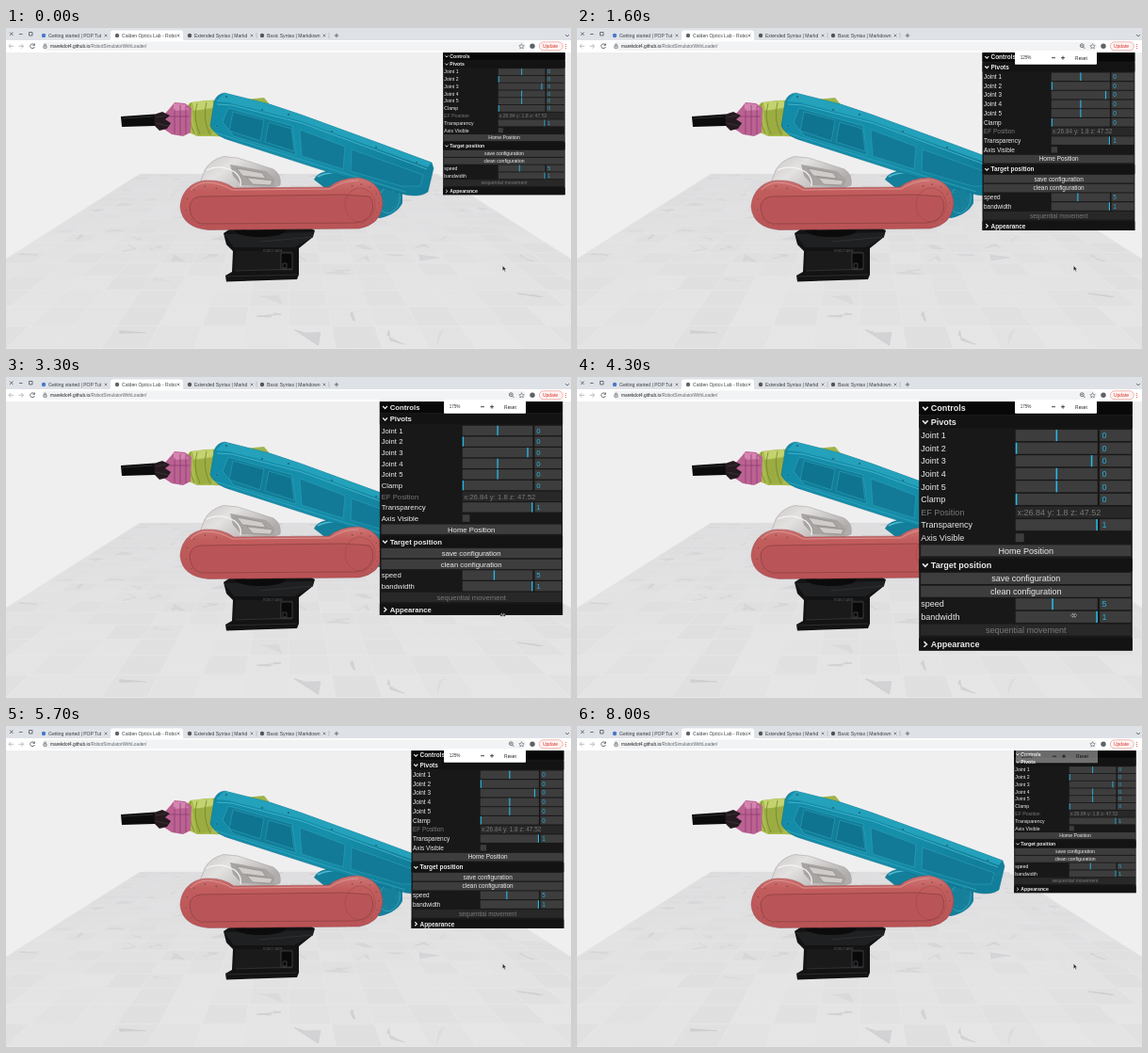
An HTML page for the animation above (8.1 s loop, 600 by 341 pixels).

```html
<!DOCTYPE html>
<html lang="en">
<head>
<meta charset="utf-8">
<title>Robot simulator zoom</title>
<style>
html, body { margin: 0; width: 100%; height: 100%; overflow: hidden; background: #f0eff0; }
svg { display: block; width: 100vw; height: 100vh; font-family: "Liberation Sans", Arial, sans-serif; }
text { white-space: pre; }
.line { fill: none; stroke: #5f6368; stroke-width: .9; }
</style>
</head>
<body>
<svg viewBox="0 0 600 341" preserveAspectRatio="none">
  <defs>
    <linearGradient id="red" x2="0" y2="1">
      <stop offset="0" stop-color="#cf7876"/><stop offset=".25" stop-color="#c25d5d"/><stop offset="1" stop-color="#b95356"/>
    </linearGradient>
    <linearGradient id="blue" x2="1" y2=".4">
      <stop offset="0" stop-color="#128ba8"/><stop offset=".6" stop-color="#168fab"/><stop offset="1" stop-color="#117f9b"/>
    </linearGradient>
    <linearGradient id="white" x2="1" y2=".5">
      <stop offset="0" stop-color="#c9c6c4"/><stop offset=".4" stop-color="#e4e2e1"/><stop offset="1" stop-color="#b0adac"/>
    </linearGradient>
    <linearGradient id="haze" x2="0" y2="1">
      <stop offset="0" stop-color="#dad9db" stop-opacity=".6"/><stop offset="1" stop-color="#e8e8e9" stop-opacity=".15"/>
    </linearGradient>
    <clipPath id="page"><path d="M0 26H600V341H0z"/></clipPath>
  </defs>

  <g clip-path="url(#page)">
    <rect y="26" width="600" height="315" fill="#f0eff0"/>
    <g id="floor"></g>
    <path d="M142 155H458L752 341H-152z" fill="url(#haze)"/>

    <!-- base -->
    <path d="M231 218L240 212H322L328 215L326 222L311 234V262L309 267L234 269.5L233 263L240 259L241 237L234 230z" fill="#131314"/>
    <path d="M232 219L326 217V222L306 233H242z" fill="#1f2021"/>
    <path d="M244 237H304V258H242z" fill="#1a1a1b"/>
    <path d="M234 264L309 262M244 258L304 256M270 227L326 222" stroke="#38383a" stroke-width=".7"/>
    <path d="M292 239H304V256H292zM294 250H298V255H294z" fill="#09090a" stroke="#5a5a5c" stroke-width=".6"/>
    <text x="273" y="238" font-size="3.4" fill="#55565a">ROBOT ARM</text>
    <ellipse cx="270" cy="215" rx="27" ry="7" fill="#0b0b0c"/>

    <!-- shoulder -->
    <path d="M206 165L211 151Q217 140 231 136.5L246 138L284 150Q293 156 291 167L280 171H208z" fill="url(#white)" stroke="#9c9997" stroke-width=".5"/>
    <path d="M238 145L276 152L286 161L284 168L250 167L241 157z" fill="#a7a4a2"/>
    <path d="M245 149L272 154L276 160L251 157zM256 159L283 162L281 167L262 166z" fill="#cfccca" stroke="#868381" stroke-width=".6"/>
    <path d="M213 151Q227 144 243 153Q251 160 249 168" fill="none" stroke="#f6f5f4" stroke-width="1.2"/>

    <!-- wrist -->
    <path d="M254 76L274 74L279 80L281 87L250 84z" fill="#9fb44c"/>
    <path d="M190 85L196 79L212 77L240 76V116L220 115L203 115L192 110z" fill="#a9bb4d"/>
    <path d="M198 79L219 77L222 84L200 88z" fill="#c4d36f"/>
    <path d="M198 88L219 86V113L203 114z" fill="#9bad42"/>
    <path d="M196 80Q192 97 200 112M203 80Q198 96 206 113M213 79Q208 96 217 114" fill="none" stroke="#71832d" stroke-width=".8"/>
    <path d="M175 84L179 79L190 80L197 85L196 111L188 115L176 113L167 107L168 92z" fill="#bb6292"/>
    <path d="M178 80L190 81L194 87L178 88z" fill="#d585b0"/>
    <path d="M179 86V113M185 82V114M191 83V113M172 94H195" stroke="#84386a" stroke-width=".7"/>
    <path d="M122 94L158 91.5V104L123 105z" fill="#0c0c0d"/>
    <path d="M157 92L166 89L174 93L169 97L175 101L171 107L163 109L158 104z" fill="#241a20"/>
    <path d="M124 96L156 94M159 95L170 93M159 101L172 104" stroke="#444" stroke-width=".6"/>

    <!-- elbow -->
    <path d="M327 161Q331 152 348 151L400 160L421 173V186Q415 198 397 202L385 200L345 175z" fill="#147f9b"/>
    <ellipse cx="407" cy="182" rx="11" ry="15" transform="rotate(15 407 182)" fill="#16809b" stroke="#3aa9c0" stroke-width=".7"/>
    <path d="M331 158Q348 149 366 160" fill="none" stroke="#4dbbd0" stroke-width="1.5"/>

    <!-- upper arm -->
    <path d="M217 104L221 78Q224 70 232 69L280 81L313 92L398 123L452 143L454 149L448 174Q440 180 424 177L349 155L240 120Q222 115 217 104z" fill="url(#blue)" stroke="#0d6b85" stroke-width=".5"/>
    <path d="M232 69L280 81L313 92L398 123L452 143L448 148L314 99L236 79L223 78z" fill="#24a1bb"/>
    <path d="M224 81L240 82L314 101L447 150" fill="none" stroke="#4fbacf" stroke-width=".8"/>
    <path d="M236 85L304 104L308 135L242 115L230 100z" fill="#117d98" stroke="#36a6be" stroke-width=".6"/>
    <path d="M241 89L274 98L270 120L237 109zM279 100L303 107L306 131L275 121z" fill="#0f7490" stroke="#2ea1bb" stroke-width=".6"/>
    <path d="M312 108L360 126L358 150L314 136zM367 129L443 156L440 168L420 168L366 152z" fill="#127a96" stroke="#2f9fb8" stroke-width=".6"/>
    <path d="M222 111L345 150L424 174" fill="none" stroke="#3aa9c0" stroke-width=".7"/>
    <g id="blueBolts" fill="#0b5f79" stroke="#45b0c6" stroke-width=".4"></g>

    <!-- forearm -->
    <path d="M185 190C186 173 198 163 212 162Q230 161 242 170L343 169Q355 159 374 159Q399 163 400 187Q398 209 375 213L215 214.5Q187 212 185 190z" fill="url(#red)" stroke="#94464a" stroke-width=".5"/>
    <path d="M196 172Q203 165 213 164Q229 165 240 172L344 171Q358 162 374 162" fill="none" stroke="#dc9390" stroke-width="1"/>
    <path d="M195 190Q196 180 207 179L358 177L386 179Q391 184 389 194Q385 206 371 207L207 208Q196 205 195 190z" fill="#b95558" stroke="#8d4043" stroke-width=".8"/>
    <ellipse cx="376" cy="188" rx="16" ry="18" fill="none" stroke="#a04649" stroke-width=".6"/>
    <g id="redBolts" fill="#8d4043" stroke="#d78b88" stroke-width=".3"></g>

    <g id="panel" font-size="5.16" fill="#ebebeb"></g>
    <path id="arrow" d="M527.3 252.5V258L528.7 256.8L529.7 259L530.5 258.6L529.6 256.5H531.3z" fill="#222" stroke="#fff" stroke-width=".4"/>
    <path id="resize" d="M524.5 253.2L526.6 251.2V252.6H528.6V251.2L530.7 253.2L528.6 255.2V253.8H526.6V255.2z" fill="#111" stroke="#fff" stroke-width=".5"/>
  </g>

  <!-- browser bar -->
  <g id="bar">
    <rect width="600" height="13.5" fill="#dee1e6"/>
    <rect y="13" width="600" height="13" fill="#fff"/>
    <path d="M109 13.5Q111 13.5 111 11V5Q111 2.5 113.5 2.5H185.5Q188 2.5 188 5V11Q188 13.5 190 13.5z" fill="#fff"/>
    <path d="M266 5V11M343 5V11" class="line" style="stroke:#9a9da2;stroke-width:.5"/>
    <path d="M4 4.5L7.5 8M7.5 4.5L4 8M14 6.5H17.5M24.5 4.5H28V8H24.5z" class="line"/>
    <path d="M348.8 8H353.2M351 5.8V10.2M594 7L596 9L598 7" class="line"/>
    <rect x="38" y="14.6" width="514" height="9.4" rx="4.7" fill="#f1f3f4"/>
    <g class="line">
      <path d="M8 19.3H3M5.2 17L3 19.3L5.2 21.6M13.5 19.3H18.5M16.3 17L18.5 19.3L16.3 21.6" stroke="#b4b7ba"/>
      <path d="M30 17.8A2.4 2.4 0 1 0 30.4 20M30.4 16.5V18.4H28.5"/>
      <path d="M40 19H43V21.3H40zM40.5 19V18A1 1 0 0 1 42.5 18V19" stroke-width=".7"/>
      <path d="M547.5 16.7L548.3 18.5L550.2 18.7L548.8 20L549.2 21.9L547.5 20.9L545.8 21.9L546.2 20L544.8 18.7L546.7 18.5z" stroke-width=".6"/>
      <g id="lens"><circle cx="536.3" cy="18.7" r="1.9"/><path d="M537.7 20.2L539.5 22M535.4 18.7H537.2"/></g>
    </g>
    <circle cx="559" cy="19.3" r="2.7" fill="#5f6368"/>
    <rect x="566.3" y="14.8" width="25" height="9" rx="4.5" fill="#fdf3f2" stroke="#e58b84" stroke-width=".6"/>
    <text x="578" y="21.2" font-size="5" text-anchor="middle" fill="#d93025">Update</text>
    <path d="M594.5 17V17.8M594.5 19V19.8M594.5 21V21.8" class="line" style="stroke:#d93025"/>
    <text y="21" x="47" font-size="4.8" fill="#202124">marekdot4.github.io<tspan fill="#5f6368">/RobotSimulatorWithLoader/</tspan></text>
  </g>

  <g id="bubble">
    <rect x="464.6" y="25.6" width="88" height="14" rx="1" fill="#000" opacity=".18"/>
    <rect x="465" y="25" width="87" height="13.8" rx=".8" fill="#fff"/>
    <text id="level" x="476.5" y="33.3" font-size="4.6" text-anchor="middle" fill="#333"></text>
    <path d="M504 31.7H508M514 31.7H518M516 29.7V33.7" class="line" style="stroke:#333"/>
    <text x="535.5" y="33.5" font-size="4.9" text-anchor="middle" fill="#222">Reset</text>
  </g>
</svg>
<script>
const $ = id => document.getElementById(id);
const add = (id, markup) => $(id).insertAdjacentHTML("beforeend", markup);

let seed = 11;
const rand = () => (seed = seed * 16807 % 2147483647) / 2147483647;

// Floor of marble tiles seen in perspective
function floorPoint(u, v) {
  const depth = 1 / (.01 - v * 3.25e-4);
  return [300 + u * .175 * depth, 55 + depth].map(n => n.toFixed(1)).join(" ");
}
let tiles = "";
for (let v = 0; v < 22; v++) for (let u = -9; u < 9; u++) {
  const g = 222 + Math.floor(rand() * 8);
  const at = (a, b) => floorPoint(u + a, v + b);
  tiles += `<path d="M${at(0, 0)}L${at(1, 0)} ${at(1, 1)} ${at(0, 1)}z" fill="rgb(${g},${g},${g + 1})" stroke="#e8e7e9" stroke-width=".7"/>`;
  if (rand() < .16) {
    const spot = () => at(.1 + rand() * .8, .1 + rand() * .8);
    tiles += `<path d="M${spot()}L${spot()} ${spot()} ${spot()}" fill="#bdbec1" stroke="#b4b5b8" stroke-linejoin="round" opacity="${(.2 + rand() * .4).toFixed(2)}"/>`;
  }
}
add("floor", tiles);

const bolt = (x, y, r) => `<circle cx="${x}" cy="${y}" r="${r}"/>`;
const ring = (cx, cy, rx, ry, from, to, n) => Array.from({ length: n }, (_, i) => {
  const a = from + (to - from) * i / (n - 1);
  return bolt(cx + rx * Math.cos(a), cy + ry * Math.sin(a), 1.1);
}).join("");
add("redBolts", ring(213, 189, 22, 21, 1.8, 5.2, 7) + ring(376, 187, 20, 21, -2, 1.4, 8));
add("blueBolts", [[234, 73], [272, 87], [300, 92], [346, 110], [393, 127], [436, 143], [224, 104], [447, 157]]
  .map(([x, y]) => bolt(x, y, 1.3)).join("") + ring(407, 182, 8, 11, -1, 4, 6));

// Browser tabs
[[40, 45, "Getting started | POP Tut", 106, "#4a78c8"], [118, 123, "Calden Optics Lab - Robo", 183, "#5f6368"],
 [195, 200, "Extended Syntax | Markd", 261, "#555"], [272, 277, "Basic Syntax | Markdown", 338, "#555"]]
  .forEach(([icon, x, title, close, color]) => add("bar",
    `<circle cx="${icon}" cy="8" r="2.2" fill="${color}"/>
     <text x="${x}" y="9.9" font-size="5.05" fill="#3c4043">${title}</text>
     <path d="M${close - 1.4} 6.6l2.8 2.8m0 -2.8l-2.8 2.8" class="line" style="stroke-width:.7"/>`));

// Control panel, laid out at 100 % zoom
const WIDTH = 129.5;
const box = (x, y, w, h = 6.9, fill = "#3d3d3d") => `<rect x="${x}" y="${y - h / 2}" width="${w}" height="${h}" fill="${fill}"/>`;
const label = (x, y, s, more = "") => `<text x="${x}" y="${y + 1.85}" ${more}>${s}</text>`;
const title = (y, s, open = true, fill = "#131313") => box(0, y, WIDTH, 7.6, fill) +
  `<path d="${open ? `M2.2 ${y - .8}l1.6 1.7 1.6-1.7` : `M3 ${y - 1.6}l1.7 1.6-1.7 1.6`}" fill="none" stroke="#ebebeb" stroke-width=".9"/>` +
  label(7.2, y, s, 'font-weight="bold"');
const slider = (y, s, part, value) => label(1.2, y, s) + box(58.6, y, 49.7) + box(109.7, y, 19.1) +
  box(58.6 + part * 48.9, y, .9, 6.9, "#28b8e6") + label(111, y, value, 'fill="#28b0dc"');
const button = (y, s) => box(1.1, y, 127.6) + label(64.9, y, s, 'text-anchor="middle"');
const dim = s => `<g opacity=".45">${s}</g>`;

add("panel", `<rect width="${WIDTH}" height="151.2" fill="#181818"/>` +
  title(4.1, "Controls", true, "#080808") + title(12.4, "Pivots") +
  slider(20.6, "Joint 1", .5, 0) + slider(28.4, "Joint 2", 0, 0) + slider(36.1, "Joint 3", .935, 0) +
  slider(43.9, "Joint 4", .5, 0) + slider(51.6, "Joint 5", .5, 0) + slider(59.4, "Clamp", 0, 0) +
  dim(label(1.2, 67.2, "EF Position") + box(58.6, 67.2, 70.2) + label(59.6, 67.2, "x:26.84 y: 1.8 z: 47.52")) +
  slider(74.9, "Transparency", 1, 1) +
  label(1.2, 82.7, "Axis Visible") + box(58.6, 82.7, 5.1, 5.1) +
  button(90.5, "Home Position") + title(99.3, "Target position") +
  button(107.4, "save configuration") + button(115.3, "clean configuration") +
  slider(123, "speed", .45, 5) + slider(130.8, "bandwidth", 1, 1) +
  dim(button(138.6, "sequential movement")) + title(147.4, "Appearance", false));

// Zoom label changes first; the page follows one step later
const LOOP = 8100, LAG = 100, FADE = 7900;
const zooms = [[0, 100], [700, 110], [1300, 125], [2200, 150], [3300, 175],
               [4900, 150], [5300, 125], [5900, 110], [6500, 100]];
const zoomAt = t => zooms.filter(([start]) => start <= t).pop()[1];
const show = (id, on) => $(id).style.display = on ? "" : "none";

function draw(now) {
  const t = Math.floor(now % LOOP / 100) * 100;
  const level = zoomAt(t), z = zoomAt(Math.max(0, t - LAG)) / 100;
  const left = 600 - 1.25 - 5.1 * z - WIDTH * z;
  const fade = Math.max(0, (t - FADE + 100) / 200);
  $("panel").setAttribute("transform", `translate(${left} 26) scale(${z})`);
  $("level").textContent = level + "%";
  show("bubble", t >= zooms[1][0]);
  $("bubble").style.opacity = 1 - .6 * fade;
  $("bubble").setAttribute("transform", `translate(${fade} ${fade / 2})`);
  show("lens", t >= zooms[1][0] && t < FADE);
  show("resize", level === 175);
  show("arrow", level !== 175);
  requestAnimationFrame(draw);
}
requestAnimationFrame(draw);
</script>
</body>
</html>
```
